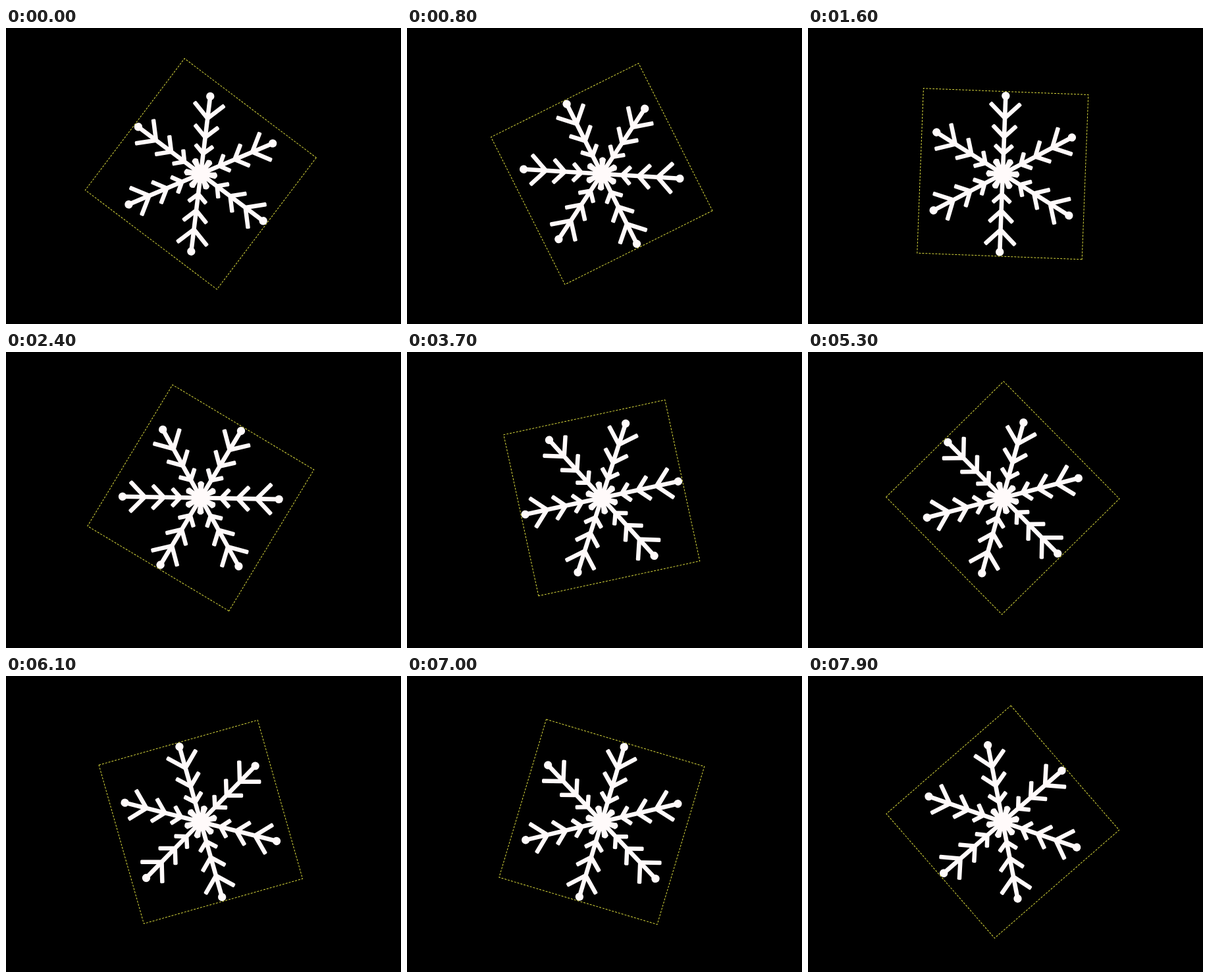
An HTML page with a canvas for the animation above (8 s loop, 600 px wide and 450 px high).

```html
<!DOCTYPE html>
<html lang="en">
<head>
<meta charset="utf-8">
<title>Turning snowflake</title>
<style>
  html, body { margin: 0; width: 100%; height: 100%; overflow: hidden; background: #000; }
  canvas { display: block; }
</style>
</head>
<body>
<canvas id="stage" width="600" height="450"></canvas>
<script>
const ctx = document.getElementById('stage').getContext('2d');
const LOOP = 8000, STEP = 100;
const CENTER = [295.8, 221.8], SIDE = 250.6;
const RAD = Math.PI / 180;

// Pairs of twigs: where they leave the stem, then their tip (x, distance)
const TWIGS = [[85, 23.2, 107.6], [56, 18.2, 73.6], [31, 13.8, 43.8]];

function bar(x1, y1, x2, y2, width, radius) {
  ctx.save();
  ctx.translate(x1, y1);
  ctx.rotate(Math.atan2(y2 - y1, x2 - x1));
  ctx.beginPath();
  ctx.roundRect(0, -width / 2, Math.hypot(x2 - x1, y2 - y1), width, radius);
  ctx.fill();
  ctx.restore();
}

function disc(x, y, r) {
  ctx.beginPath();
  ctx.arc(x, y, r, 0, 2 * Math.PI);
  ctx.fill();
}

function petal() {
  ctx.beginPath();
  ctx.moveTo(-3, -8);
  ctx.lineTo(-5, -22.5);
  ctx.quadraticCurveTo(0, -28.5, 5, -22.5);
  ctx.lineTo(3, -8);
  ctx.fill();
}

function arm() {
  bar(0, 0, 0, -118, 6.6, 0);
  disc(0, -118.8, 6.2);
  for (const [base, x, tip] of TWIGS) {
    bar(0, -base, x, -tip, 6.5, 1.8);
    bar(0, -base, -x, -tip, 6.5, 1.8);
  }
}

function flake() {
  ctx.fillStyle = '#fffafa';
  for (let i = 0; i < 6; i++) {
    arm();
    ctx.rotate(30 * RAD);
    petal();
    ctx.rotate(30 * RAD);
  }
  disc(0, 0, 14);
}

function border() {
  const h = SIDE / 2;
  ctx.strokeStyle = '#d8d83c';
  ctx.lineWidth = 1;
  ctx.setLineDash([3, 2]);
  ctx.strokeRect(-h, -h, SIDE, SIDE);
  ctx.setLineDash([]);
}

// One turn in ten seconds, with a slightly slower start
function angle(t) {
  return 124.6 + 0.036 * t + 2.4 * Math.max(0, 1 - t / 400);
}

function draw(t) {
  ctx.fillStyle = '#000';
  ctx.fillRect(0, 0, 600, 450);
  ctx.save();
  ctx.translate(...CENTER);
  ctx.rotate(angle(t) * RAD);
  flake();
  border();
  ctx.restore();
}

const start = performance.now();
function tick() {
  const t = (performance.now() - start) % LOOP;
  draw(Math.floor(t / STEP) * STEP);
  requestAnimationFrame(tick);
}
tick();
</script>
</body>
</html>
```
